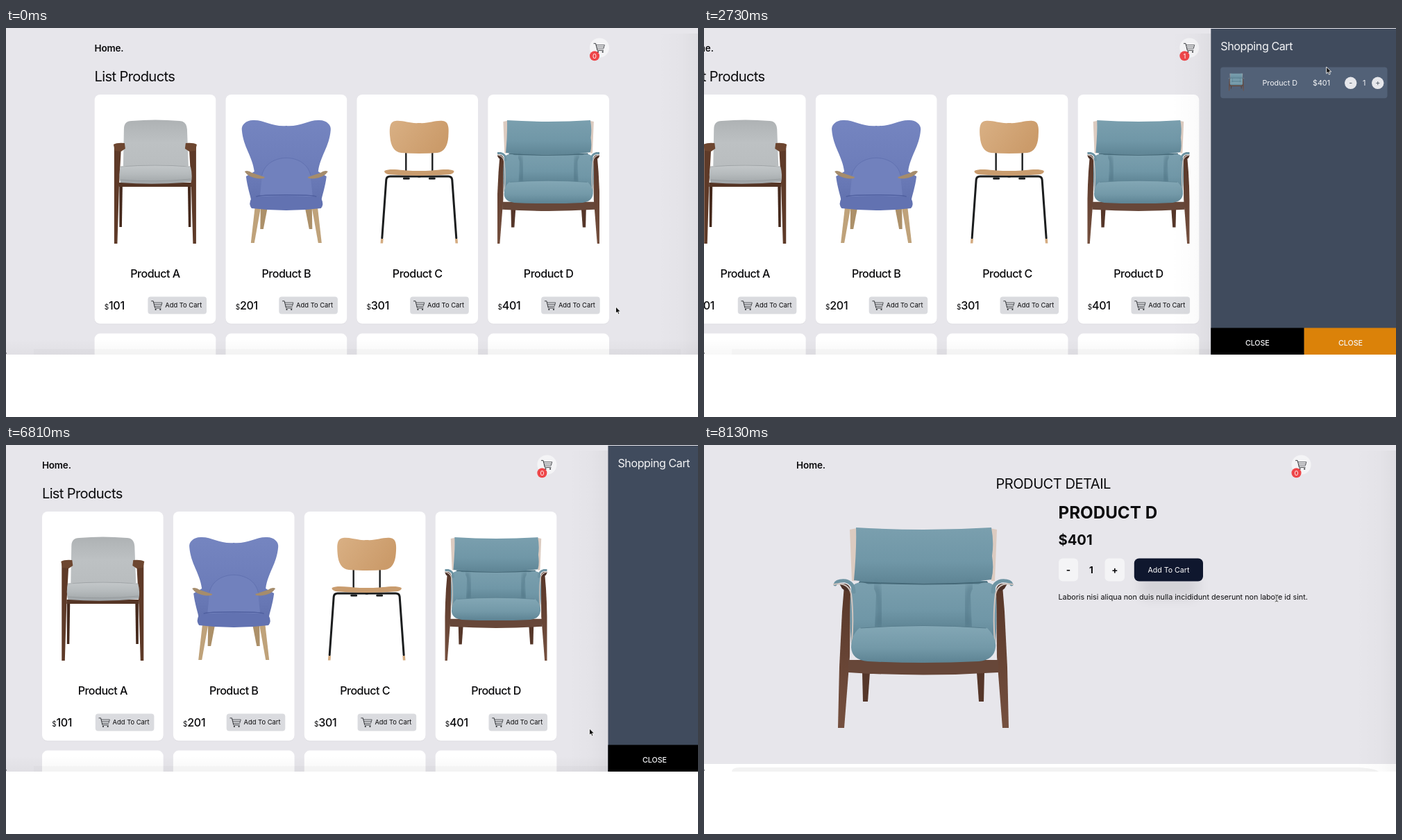
Recreate the animation shown at these times as an HTML page. Size 997 px wide and 561 px high, loop 8280 ms.

```html
<!DOCTYPE html>
<html lang="en">
<head>
<meta charset="utf-8">
<title>Shop cart</title>
<style>
html, body { margin: 0; width: 100%; height: 100%; overflow: hidden; background: #fff; }
svg { display: block; font-family: Inter, "Open Sans", sans-serif; font-optical-sizing: none; }
</style>
</head>
<body>
<svg id="stage" width="997" height="561" viewBox="0 0 997 561"></svg>
<script>
const LOOP = 8280, SHIFT = 157, PANEL = 269, PAGE_SWITCH = 7560;

// Markup helpers
const rect = (x, y, w, h, fill, r = 0, more = '') =>
  `<rect x="${x}" y="${y}" width="${w}" height="${h}" rx="${r}" fill="${fill}" ${more}/>`;
const path = (d, fill, more = '') => `<path d="${d}" fill="${fill}" ${more}/>`;
const line = (d, color, width, more = '') =>
  path(d, 'none', `stroke="${color}" stroke-width="${width}" stroke-linecap="round" stroke-linejoin="round" ${more}`);
const circle = (x, y, r, fill) => `<circle cx="${x}" cy="${y}" r="${r}" fill="${fill}"/>`;
const group = (x, y, body, more = '') => `<g transform="translate(${x} ${y})" ${more}>${body}</g>`;
const mirror = body => `${body}<g transform="scale(-1 1)">${body}</g>`;
const text = (x, y, size, str, { w = 400, ls = 0, mid = false, fill = '#0b0b0d', more = '' } = {}) =>
  `<text x="${x}" y="${y}" font-size="${size}" font-weight="${w}" letter-spacing="${ls}em" fill="${fill}"` +
  `${mid ? ' text-anchor="middle"' : ''} ${more}>${str}</text>`;
const gradient = (id, stops, dir = 'x2="0" y2="1"') =>
  `<linearGradient id="${id}" ${dir}>${stops.map(([at, c, o = 1]) =>
    `<stop offset="${at}" stop-color="${c}" stop-opacity="${o}"/>`).join('')}</linearGradient>`;

const defs = `<defs>
  ${gradient('grey', [[0, '#aeb2b4'], [.5, '#bdc1c3'], [1, '#b9bdbf']])}
  ${gradient('greySeat', [[0, '#c4c8ca'], [.5, '#b5babc'], [1, '#9fa4a7']])}
  ${gradient('violet', [[0, '#7585c0'], [.6, '#6c7cb9'], [1, '#6070ad']])}
  ${gradient('oak', [[0, '#d9b084'], [1, '#cb9b6a']], 'x2="1" y2=".4"')}
  ${gradient('teal', [[0, '#7a9fae'], [.6, '#7097a7'], [1, '#5f8595']])}
  ${gradient('tealSeat', [[0, '#83a7b5'], [.6, '#7399a8'], [1, '#5d8393']])}
  ${gradient('walnut', [[0, '#583729'], [1, '#75503f']])}
  ${gradient('shade', [[0, '#000', 0], [.6, '#000', .014], [1, '#000', .04]], 'x2="1" y2="0"')}
  ${gradient('floor', [[0, '#000', 0], [1, '#000', .03]])}
  <filter id="blur" x="-50%" y="-100%" width="200%" height="300%"><feGaussianBlur stdDeviation="9"/></filter>
  <filter id="soft" x="-50%" y="-50%" width="200%" height="200%"><feGaussianBlur stdDeviation="4"/></filter>
  <clipPath id="view"><rect width="997" height="471"/></clipPath>
  <clipPath id="photo"><rect x="-73.5" y="120" width="147" height="200"/></clipPath>
</defs>`;

// Chairs, drawn around x = 0
const greyChair = mirror(
    path('M-51.5 226H-47L-48 287H-51.5Z', '#45291c') +
    path('M-59 171L-49 173L-52 228L-54.5 311H-59Z', '#5e3a28')) +
  rect(-52, 223, 104, 6, '#553525') +
  path('M-45 146Q-45 134 -34 134Q0 131 35 134Q45 134 46 146L48 199H-46Z', 'url(#grey)') +
  path('M-50 200Q0 195 51 200Q54 212 52 222Q0 227 -50 223Q-53 212 -50 200Z', 'url(#greySeat)') +
  line('M-50 200Q0 196 50 200', '#979c9f', .8) +
  line('M-50 219Q0 223 51 218', '#92979a', .8) +
  mirror(path('M-60 168Q-55 165 -44 166L-43 174L-49 178L-58 177Z', '#6d4630'));

const violetChair = mirror(
    path('M-37 259H-27L-33 290H-37.5Z', '#ac9069') +
    path('M-45 257H-36.5L-46 310H-51Z', '#bfa27a') +
    path('M1 141C-20 143 -32 132 -48 133C-58 133 -65 140 -64 147C-62 172 -49 184 -46 207' +
      'L-58 214C-56 230 -52 240 -50 251L1 256Z', 'url(#violet)')) +
  path('M-35 214C-30 179 30 179 35 214L38 243H-38Z', '#7181bd') +
  line('M-35 212C-28 179 28 179 35 212', '#5f6fae', .8) +
  line('M-43 243C-36 240 36 240 43 243', '#5060a0', 1.4) +
  path('M-50 245Q0 239 50 245Q55 255 50 260Q0 266 -50 260Q-55 254 -50 245Z', '#6272b1') +
  mirror(path('M-60 207Q-56 204 -49 209L-31 215Q-31 218 -41 217Q-55 215 -60 207Z', '#a58c6c'));

const oakChair = mirror(
    line('M-19 178V208', '#1d1f20', 2.4) +
    line('M1 214H-42Q-47 214 -47.5 219L-53.5 303', '#1b1d1e', 3) +
    line('M-22 217H-15', '#1b1d1e', 3) +
    path('M-55.2 304H-51.7L-52.2 310.5H-55.8Z', '#d4ab80')) +
  path('M0 137C14 138 22 133 34 134C43 135 43 145 42 157C41 170 36 179 26 180Q0 182 -26 180' +
    'C-36 179 -41 170 -42 157C-43 145 -43 135 -34 134C-22 133 -14 138 0 137Z', 'url(#oak)') +
  path('M0 206C20 207 40 201 50 206Q51 209 45 211Q0 215 -45 211Q-51 209 -50 206C-40 201 -20 207 0 206Z', '#c99c6e');

// Large armchair: 260 wide, from y = 118 to 408
const fold = (d, width = 9, opacity = .35) =>
  line(d, '#3f6474', width, `opacity="${opacity}" filter="url(#soft)"`);
const tealChair = mirror(
    path('M-88 328H-77L-80 370H-87Z', '#553629') +
    path('M-114 203L-105 208L-106 305L-114 408H-123L-121 320L-117 240Z', 'url(#walnut)') +
    path('M-106 122L-96 120L-98 196H-103Z', '#dccbc0')) +
  path('M-108 310H108V328Q0 335 -108 328Z', '#674739') +
  path('M-92 196H92L76 275H-76Z', '#5f8696') +
  path('M-97 119Q0 125 98 119Q102 140 99 160Q102 180 98 194Q50 201 0 199Q-60 201 -100 195Q-96 150 -97 119Z', 'url(#teal)') +
  path('M-88 201Q0 197 88 201Q80 240 72 264H-72Q-80 230 -88 201Z', 'url(#teal)') +
  fold('M-90 200H90', 7, .5) + fold('M-60 256H60', 10, .3) +
  line('M-92 198Q0 203 92 198', '#456877', 2) +
  mirror(
    fold('M-68 205Q-60 235 -64 258', 9, .45) +
    path('M-104 206Q-98 196 -84 199Q-70 203 -68 216L-70 263Q-86 270 -93 279L-104 286Q-107 240 -104 206Z', 'url(#teal)') +
    path('M-121 200Q-106 198 -105 209Q-111 213 -117 207Z', '#4b3027') +
    line('M-127 201Q-125 195 -112 196Q-100 199 -100 212', '#6d93a2', 5) +
    line('M-129 201Q-108 197 -104 215Q-100 245 -103 285', '#d0c5bf', 2)) +
  path('M-92 264Q0 257 92 264Q106 278 104 292Q102 310 80 312Q0 316 -80 312Q-103 310 -104 292Q-104 274 -92 264Z', 'url(#tealSeat)') +
  line('M-90 264Q0 257 90 264', '#587d8d', 1);

const scaled = (y, k) => `<g transform="translate(0 ${y}) scale(${k}) translate(0 -118)">${tealChair}</g>`;
const chairs = [greyChair, violetChair, group(2.6, 0, oakChair), `<g clip-path="url(#photo)">${scaled(132.5, .6154)}</g>`];

const cartIcon = line('M0 .8H2.6L5 10.8H13.6', '#25272b', .9) +
  line('M3.2 3H15.4L13.8 8.4H4.6M4.2 5.7H14.4', '#25272b', .7) +
  circle(6, 13, 1.1, '#25272b') + circle(12.7, 13, 1.1, '#25272b');

const header = text(127.5, 34, 13.5, 'Home.', { w: 600, ls: -.012 }) +
  circle(855, 28.5, 14, '#f4f4f6') + group(847, 21.5, cartIcon) +
  circle(848, 40.2, 7, '#ee4649') +
  text(848, 43.6, 9.4, '0', { mid: true, fill: '#fff', more: 'class="badge"' });

const card = (chair, i) => group(127.6 + i * 188.9, 0,
  rect(0, 97, 174.7, 330.5, '#dedde2', 8) + rect(0, 96, 174.7, 330.5, '#fff', 8) +
  rect(0, 440.6, 174.7, 60, '#fff', 8) +
  group(87.3, 0, chair) +
  text(87.3, 360, 16.1, 'Product ' + 'ABCD'[i], { w: 550, ls: -.033, mid: true }) +
  text(14.2, 405.8, 10, '$') + text(20.4, 405.8, 16.1, `${i + 1}01`, { w: 550, ls: -.02 }) +
  rect(76.8, 387.5, 84.6, 25, '#dadbdf', 4) + group(82, 393, cartIcon) +
  text(101.6, 403.4, 9.4, 'Add To Cart'));

const home = `<g id="home"><rect width="997" height="471" fill="#e7e6eb"/><g id="content">${header}` +
  text(127.5, 77.3, 20.2, 'List Products', { ls: -.033 }) + chairs.map(card).join('') + '</g>' +
  rect(0, 448, 997, 23, 'url(#floor)') + rect(40, 463, 932, 8, '#000', 0, 'opacity=".02"') + '</g>';

const bold = { w: 700, mid: true };
const detail = `<g id="detail">${rect(0, 0, 997, 460, '#e7e6eb')}${group(5.5, 0, header)}` +
  path('M40 471Q40 465 52 465H940Q965 466 972 471Z', '#f2f2f2') +
  text(503.2, 63, 20.2, 'PRODUCT DETAIL', { ls: -.027, mid: true }) +
  group(316, 0, tealChair) +
  text(510.5, 105.6, 24.2, 'PRODUCT D', { w: 700 }) +
  text(510.5, 144.2, 20.2, '$401', { w: 700 }) +
  rect(511, 163.5, 28, 33, '#f4f4f6', 6) + rect(577.5, 163.5, 28.5, 33, '#f4f4f6', 6) +
  text(524.8, 185.4, 13.5, '-', bold) + text(558, 185.4, 13.5, '1', bold) + text(591.8, 185.4, 13.5, '+', bold) +
  rect(628, 185, 84, 36, '#000', 8, 'opacity=".08" filter="url(#blur)"') +
  rect(619.8, 163.5, 99.2, 33, '#0f172e', 7) +
  text(669.4, 184.3, 10.6, 'Add To Cart', { mid: true, fill: '#fff' }) +
  text(510.5, 223, 10.77, 'Laboris nisi aliqua non duis nulla incididunt deserunt non labore id sint.') + '</g>';

const white = { fill: '#f4f5f7', mid: true };
const closeText = { ...white, w: 500, ls: -.01 };
const roundButton = (x, sign) => circle(x, 79.3, 8.7, '#e6e7eb') + text(x, 83, 10.77, sign, { mid: true, fill: '#4b5563' });
const panel = `<g id="panel">${rect(-58, 8, 58, 463, 'url(#shade)')}${rect(0, 1, PANEL + 1, 470, '#404b5d')}` +
  text(14, 32.3, 16.1, 'Shopping Cart', { ls: -.027, fill: '#f4f5f7' }) +
  `<g id="item">${rect(13.8, 56.5, 240.4, 44.7, '#526177', 4)}` +
  group(36.6, 0, scaled(65.5, .087)) +
  text(0, 83.3, 10.77, 'Product D', { ...white, more: 'id="name"' }) +
  text(0, 83.3, 10.77, '', { ...white, more: 'id="price"' }) +
  text(221, 83.3, 10.77, '', { ...white, more: 'id="qty"' }) +
  roundButton(201.4, '-') + roundButton(240.4, '+') + '</g>' +
  rect(0, 432.5, 134.3, 38.5, '#000') + rect(134.3, 432.5, 135, 38.5, '#db8209') +
  text(67, 458, 10.77, 'CLOSE', closeText) + text(201.2, 458, 10.77, 'CLOSE', closeText) + '</g>';

const outline = 'stroke="#fff" stroke-width=".9" stroke-linejoin="round"';
const beam = 'M-2 -5Q0 -5 0 -3.4Q0 -5 2 -5M0 -3.4V3.4M-2 5Q0 5 0 3.4Q0 5 2 5';
const cursors = {
  arrow: path('M0 0V9.6L2.2 7.6L3.8 11L5.5 10.3L4 7H7Z', '#111', outline),
  hand: path('M-1 .5Q0 -1 1 .5V4.2L6 5.4Q7.4 6 7 8L6 12H-.3L-3.4 7.4Q-3 5.6 -1 7.2Z', '#111', outline) +
    line('M1.6 8V10.5M3.5 8V10.5', '#fff', .6),
  beam: line(beam, '#fff', 1.8) + line(beam, '#222', .8)
};

const $ = id => document.getElementById(id);
$('stage').innerHTML = defs + `<g clip-path="url(#view)">${home}${detail}${panel}${rect(0, 468, 1, 2, '#8a8a8e')}</g>` +
  '<g id="cursor">' + Object.entries(cursors).map(([k, body]) => `<g id="${k}">${body}</g>`).join('') + '</g>';
const badges = document.querySelectorAll('.badge');

// Pointer path: time, x, y, shape
const moves = [
  [0, 878.5, 402, 'arrow'], [390, 878.5, 402, 'arrow'], [600, 853, 401, 'hand'], [900, 822, 400, 'hand'],
  [1590, 822, 400, 'hand'], [1700, 824, 375, 'arrow'], [1820, 829, 310, 'hand'], [2070, 843, 110, 'arrow'],
  [2230, 851, 29, 'arrow'], [2400, 851, 27, 'arrow'], [2490, 857, 25, 'arrow'], [2730, 896.5, 56, 'arrow'],
  [3000, 955, 77, 'hand'], [3180, 965, 79, 'hand'], [4110, 965, 79, 'hand'], [4560, 934, 79, 'hand'],
  [4740, 935, 79, 'hand'], [6090, 935, 79, 'hand'], [6150, 929, 108, 'arrow'], [6450, 840, 433, 'hand'],
  [6540, 834.5, 442, 'hand'], [6660, 834.5, 442, 'hand'], [6760, 838, 425, 'arrow'], [6960, 848, 362, 'arrow'],
  [7110, 832, 310, 'hand'], [7440, 790, 235, 'hand'], [PAGE_SWITCH, 790, 235, 'arrow'],
  [7920, 790, 235, 'arrow'], [8040, 810, 226, 'beam'], [8130, 825, 221, 'beam']
];
const counts = [[0, 0], [1000, 1], [3390, 2], [3690, 3], [3990, 4], [4980, 3], [5400, 2], [5790, 1], [6060, 0]];

// cubic-bezier(.4, 0, .2, 1)
function ease(p) {
  if (p <= 0) return 0;
  if (p >= 1) return 1;
  let lo = 0, hi = 1, u;
  for (let i = 0; i < 24; i++) {
    u = (lo + hi) / 2;
    const v = 1 - u;
    if (1.2 * v * v * u + .6 * v * u * u + u ** 3 < p) lo = u; else hi = u;
  }
  return 3 * (1 - u) * u * u + u ** 3;
}

const lastAt = (table, t) => table.findLastIndex(row => row[0] <= t);
const show = (id, on) => $(id).setAttribute('display', on ? 'inline' : 'none');
const move = (id, x, y) => $(id).setAttribute('transform', `translate(${x} ${y})`);

function draw(t) {
  const open = ease((t - 2318.5) / 470) - ease((t - 6643) / 470);
  move('content', -SHIFT * open, 0);
  move('panel', 997 - PANEL * open, 0);
  show('home', t < PAGE_SWITCH);
  show('detail', t >= PAGE_SWITCH);

  const qty = counts[lastAt(counts, t)][1], wide = qty > 2;
  badges.forEach(b => { b.textContent = qty; });
  show('item', qty > 0);
  $('qty').textContent = qty;
  $('price').textContent = '$' + qty * 401;
  $('name').setAttribute('x', wide ? 97.5 : 99.4);
  $('price').setAttribute('x', wide ? 158 : 159.2);

  const i = lastAt(moves, t), a = moves[i], b = moves[i + 1] || a;
  const p = b === a ? 0 : (t - a[0]) / (b[0] - a[0]);
  move('cursor', a[1] + (b[1] - a[1]) * p, a[2] + (b[2] - a[2]) * p);
  for (const k in cursors) show(k, k === a[3]);
}

const start = performance.now();
function tick() {
  draw((performance.now() - start) % LOOP);
  requestAnimationFrame(tick);
}
tick();
</script>
</body>
</html>
```
